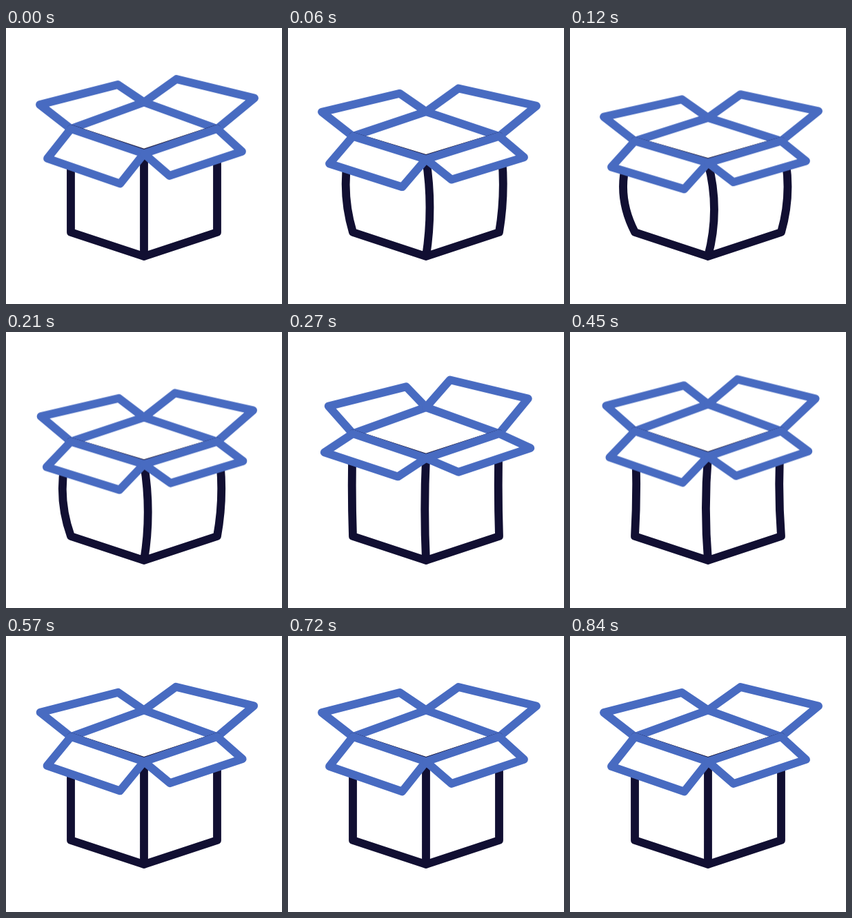
Recreate the animation shown at these times as an HTML page. Size 400 by 400 pixels, loop 900 ms.

```html
<!DOCTYPE html>
<html lang="en">
<head>
<meta charset="utf-8">
<title>Bouncing box</title>
<style>
  html, body { margin: 0; width: 100%; height: 100%; overflow: hidden; background: #fff; }
  svg { display: block; width: 100vw; height: 100vh; }
  path {
    fill: #fff; stroke: #486bc1; stroke-width: 11.8;
    stroke-linejoin: round; stroke-linecap: round;
    vector-effect: non-scaling-stroke;
  }
  .body, .rim { fill: none; stroke: #110f32; }
  .lid, .body, .flap { animation: 900ms linear infinite; }

  /* The lid squashes towards the base, stretches, then rests. */
  .lid { transform-origin: 200px 290px; animation-name: lid; }
  @keyframes lid {
    0% { transform: scaleY(1); animation-timing-function: cubic-bezier(.35, .1, .5, 1); }
    13.9% { transform: scaleY(.876); animation-timing-function: cubic-bezier(.6, 0, .6, 1); }
    36.7% { transform: scaleY(1.026); animation-timing-function: cubic-bezier(.6, 0, .8, 1); }
    60%, 100% { transform: scaleY(1); }
  }

  /* The walls bulge and pinch along with the lid. */
  .body { animation-name: body; }
  @keyframes body {
    0% {
      d: path("M94 146Q94 221 94 296L200 331L306 296Q306 221 306 146M200 182Q200 256 200 331");
      animation-timing-function: cubic-bezier(.35, .1, .5, 1);
    }
    13.9% {
      d: path("M94 164Q60 230 94 296L200 331L306 296Q325 230 306 164M200 195.4Q218 263 200 331");
      animation-timing-function: cubic-bezier(.6, 0, .6, 1);
    }
    36.7% {
      d: path("M94 142.3Q101 219 94 296L200 331L306 296Q297 219 306 142.3M200 179.2Q190 255 200 331");
      animation-timing-function: cubic-bezier(.6, 0, .8, 1);
    }
    60%, 100% {
      d: path("M94 146Q94 221 94 296L200 331L306 296Q306 221 306 146M200 182Q200 256 200 331");
    }
  }

  /* Each flap dips with the lid, swings open and settles slowly. */
  .flap { d: var(--rest); animation-name: flap; }
  @keyframes flap {
    0% { d: var(--rest); animation-timing-function: cubic-bezier(.35, .1, .5, 1); }
    13.9% { d: var(--low); animation-timing-function: cubic-bezier(.9, 0, .5, 1); }
    36.7% { d: var(--open); animation-timing-function: cubic-bezier(.22, 1, .36, 1); }
    93.3%, 100% { d: var(--rest); }
  }
  .back-left {
    --rest: path("M94 146L49 111L162 82L200 107.5Z");
    --low: path("M94 146L49 106L162 77L200 107.5Z");
    --open: path("M94 146L62.5 105.8L175 77.5L200 107.5Z");
  }
  .back-right {
    --rest: path("M200 107.5L247 74L360 101.5L306 146Z");
    --low: path("M200 107.5L247 69L360 96.5L306 146Z");
    --open: path("M200 107.5L230 66.8L343 94.1L306 146Z");
  }
  .front-left {
    --rest: path("M94 146L60 189L165.5 225.5L200 182Z");
    --low: var(--rest);
    --open: path("M94 146L50 167.2L157 202.3L200 182Z");
  }
  .front-right {
    --rest: path("M200 182L237 214L342 179L306 146Z");
    --low: var(--rest);
    --open: path("M200 182L251 197.4L355 162.3L306 146Z");
  }
</style>
</head>
<body>
<svg viewBox="0 0 400 400">
  <path class="body" d="M94 146Q94 221 94 296L200 331L306 296Q306 221 306 146M200 182Q200 256 200 331"/>
  <g class="lid">
    <path class="flap back-left"/>
    <path class="flap back-right"/>
    <path class="rim" d="M94 146L200 181L306 146"/>
    <path class="flap front-left"/>
    <path class="flap front-right"/>
  </g>
</svg>
</body>
</html>
```
